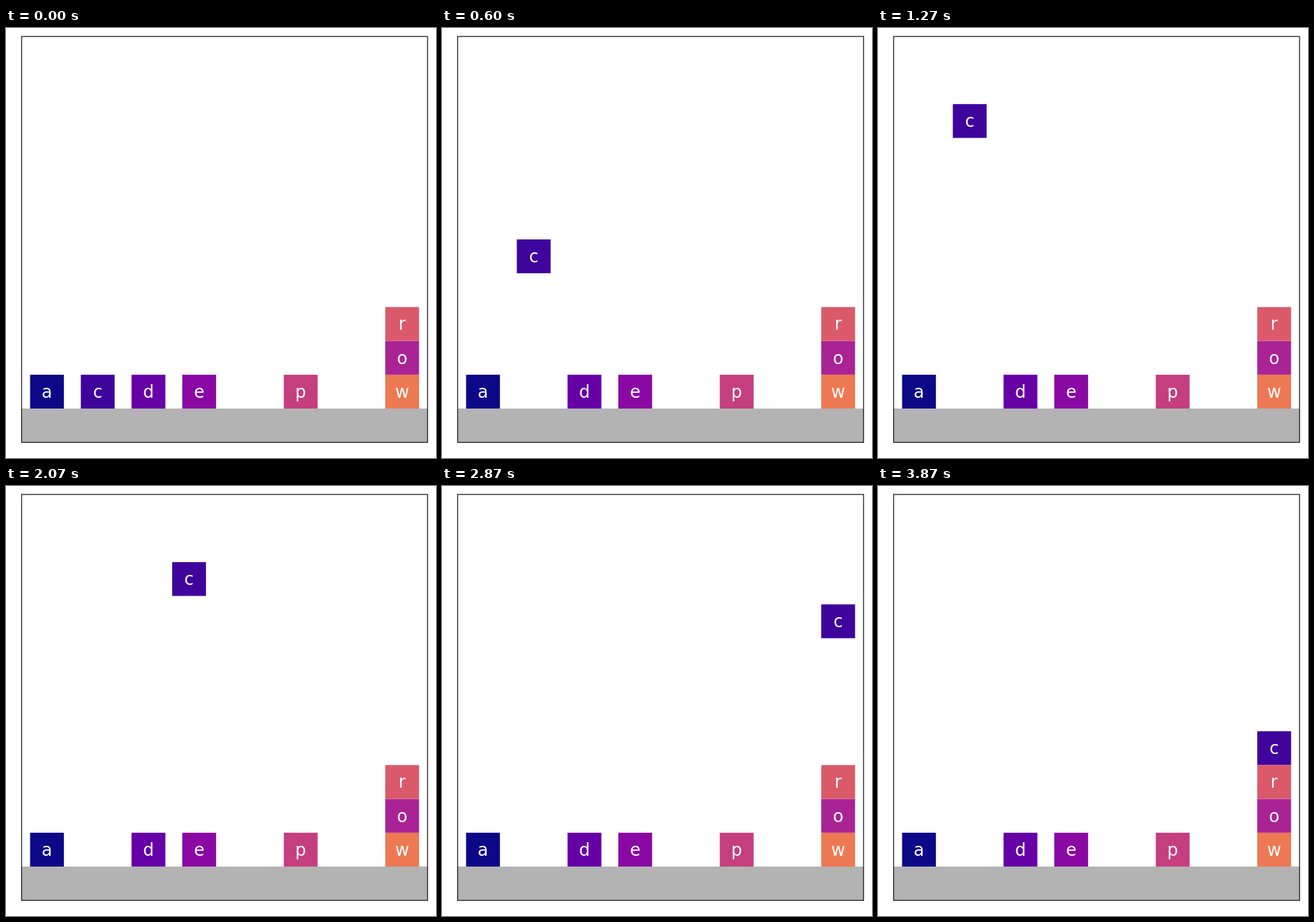
An HTML page that plays this animation: 600 by 600 pixels, repeating every 4.87 s.

```html
<!DOCTYPE html>
<html lang="en">
<head>
<meta charset="utf-8">
<title>Stacking blocks</title>
<style>
  html, body { margin: 0; width: 100%; height: 100%; overflow: hidden; background: #fff; }
  svg { display: block; width: 100vw; height: 100vh; }
  text { font: 24px "DejaVu Sans", sans-serif; fill: #fff; text-anchor: middle; }
</style>
</head>
<body>
<svg id="stage" viewBox="0 0 600 600">
  <rect x="21.8" y="531" width="566.4" height="47.2" fill="#b3b3b3"/>
  <g id="blocks"></g>
  <rect x="21.8" y="11.8" width="566.4" height="566.4" fill="none" stroke="#000" stroke-width="1.1"/>
</svg>
<script>
const UNIT = 47.2, GROUND = 531, LEFT = 33.6, LOOP = 4870;

// letter, colour, column, level
const BLOCKS = [
  ["a", "#0d0887", 0, 0],
  ["c", "#3f049c", 1, 0],
  ["d", "#6600a7", 2, 0],
  ["e", "#8a09a5", 3, 0],
  ["p", "#c53e7f", 5, 0],
  ["w", "#ed7953", 7, 0],
  ["o", "#a92395", 7, 1],
  ["r", "#da5a6a", 7, 2]
];

// tick, column, level; equal ticks make a jump
const PATH = [
  [0, 1, 0], [1, 1, 0], [1, 1, 0.8], [19, 1, 8],
  [30, 1, 8], [30, 2.2, 8], [38, 7, 8], [58, 7, 3]
];

const layer = document.getElementById("blocks");

function add(parent, name, attrs) {
  const el = document.createElementNS("http://www.w3.org/2000/svg", name);
  for (const key in attrs) el.setAttribute(key, attrs[key]);
  return parent.appendChild(el);
}

function place(el, col, level) {
  const x = LEFT + col * UNIT * 1.5;
  const y = GROUND - (level + 1) * UNIT;
  el.setAttribute("transform", `translate(${x.toFixed(2)} ${y.toFixed(2)})`);
}

const parts = {};
for (const [letter, fill, col, level] of BLOCKS) {
  const g = parts[letter] = add(layer, "g", {});
  add(g, "rect", { width: UNIT, height: UNIT, fill });
  add(g, "text", { x: UNIT / 2, y: 32 }).textContent = letter;
  place(g, col, level);
}

// 15 ticks a second, each starting on a whole 10 ms
function tickAt(ms) {
  let n = Math.ceil(ms * 0.015) + 1;
  while (Math.round(n * 20 / 3) * 10 > ms) n--;
  return n;
}

function poseAt(tick) {
  let i = PATH.length - 1;
  while (PATH[i][0] > tick) i--;
  const [t0, col, level] = PATH[i];
  const next = PATH[i + 1];
  // rest at the top until the sideways move
  if (!next || (next[1] === col && next[2] === level)) return [col, level];
  const p = (tick - t0) / (next[0] - t0);
  return [col + (next[1] - col) * p, level + (next[2] - level) * p];
}

let start = null;
function draw(now) {
  if (start === null) start = now;
  const ms = Math.max(0, now - start) % LOOP;
  place(parts.c, ...poseAt(tickAt(ms)));
  requestAnimationFrame(draw);
}
requestAnimationFrame(draw);
</script>
</body>
</html>
```
